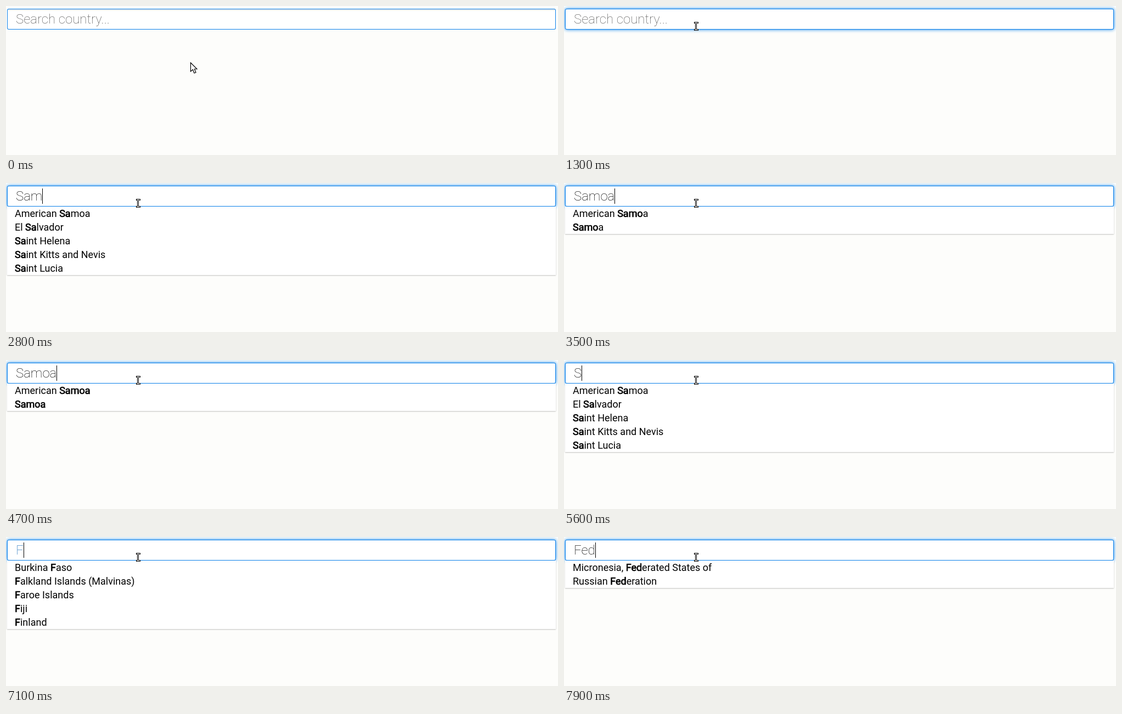
An HTML page with a canvas that plays this animation: 1006x272 px, repeating every 8000 ms.

```html
<!DOCTYPE html>
<html lang="en">
<head>
<meta charset="utf-8">
<title>Country search</title>
<style>
  html, body { margin: 0; width: 100%; height: 100%; overflow: hidden; background: #fdfdfb; }
  canvas { display: block; }
</style>
</head>
<body>
<canvas id="stage" width="1006" height="272"></canvas>
<script>
const ctx = document.getElementById('stage').getContext('2d', { alpha: false });
const LOOP = 8000;
const BLUE = '#0a80ea';
const INPUT_FONT = '100 24px Roboto, sans-serif';
const LIST_FONT = '400 18px Roboto, sans-serif';

const countries = [
  'American Samoa', 'Burkina Faso', 'El Salvador', 'Falkland Islands (Malvinas)',
  'Faroe Islands', 'Fiji', 'Finland', 'French Southern Territories',
  'Holy See (Vatican City State)', "Korea, Democratic People'S Republic of",
  'Micronesia, Federated States of', 'Russian Federation', 'Saint Helena',
  'Saint Kitts and Nevis', 'Saint Lucia', 'Samoa'
];

// [time, value]; each value holds until the next entry
const typed = [
  [0, ''], [1700, 'S'], [2300, 'Sa'], [2800, 'Sam'], [3100, 'Samo'], [3500, 'Samoa'],
  [4900, 'Samo'], [5100, 'Sam'], [5300, 'Sa'], [5600, 'S'], [5900, ''],
  [6900, 'F'], [7200, 'Fe'], [7800, 'Fed']
];
const queries = [
  [0, ''], [1800, 'S'], [2500, 'Sa'], [2900, 'Sam'], [3300, 'Samo'], [3700, 'Samoa'],
  [5100, 'Samo'], [5300, 'Sam'], [5500, 'Sa'], [5800, 'S'], [5900, ''],
  [7100, 'F'], [7400, 'Fe'], [7900, 'Fed']
];
const glow = [[0, 0], [800, 0.5], [900, 1]];
const pointer = [
  [0, [336, 103, 'arrow']], [100, [308, 86, 'arrow']], [300, [292, 74, 'arrow']],
  [400, [264, 55, 'arrow']], [500, [244, 40, 'beam']], [600, [240, 37, 'beam']]
];

const entryAt = (track, t) => track.findLast(([time]) => time <= t);
const valueAt = (track, t) => entryAt(track, t)[1];

function boxPath(x, y, w, h, r) {
  ctx.beginPath();
  ctx.roundRect(x, y, w, h, r);
}

function drawInput(focus) {
  ctx.save();
  ctx.fillStyle = BLUE;
  if (focus) {
    ctx.shadowColor = `rgba(10,128,234,${focus})`;
    ctx.shadowBlur = 6;
  }
  boxPath(2, 5, 1000, 38, 3);
  ctx.fill();
  ctx.restore();

  ctx.fillStyle = '#fff';
  boxPath(3, 6, 998, 36, 2);
  ctx.fill();

  // Soft inner edge, replaced by the glow on focus
  for (let i = 0; i < 3; i++) {
    ctx.fillStyle = `rgba(0,0,0,${(0.1 - i * 0.035) * (1 - focus)})`;
    ctx.fillRect(4, 6 + i, 996, 1);
  }
}

function drawText(t, focus) {
  const [keyTime, text] = entryAt(typed, t);
  ctx.font = INPUT_FONT;
  ctx.fillStyle = !text ? '#555' : text === 'F' ? '#2474bd' : '#000';
  ctx.fillText(text || 'Search country...', 18, 32);

  const start = keyTime || 700;
  if (focus && Math.floor((t - start) / 600) % 2 === 0) {
    ctx.fillStyle = '#000';
    ctx.fillRect(18 + Math.round(ctx.measureText(text).width), 10, 1, 28);
  }
}

function drawRow(name, query, y) {
  const at = name.search(new RegExp('\\b' + query));
  const end = at + query.length;
  let x = 16;
  [name.slice(0, at), name.slice(at, end), name.slice(end)].forEach((part, i) => {
    ctx.fillText(part, x, y);
    if (i === 1) ctx.strokeText(part, x, y);
    x += ctx.measureText(part).width;
  });
}

function drawList(query) {
  if (!query) return;
  const word = new RegExp('\\b' + query);
  const rows = countries.filter(name => word.test(name)).slice(0, 5);

  ctx.save();
  ctx.beginPath();
  ctx.rect(0, 43, 1006, 229);
  ctx.clip();
  ctx.shadowColor = 'rgba(0,0,0,0.25)';
  ctx.shadowBlur = 2;
  ctx.shadowOffsetY = 1;
  ctx.fillStyle = '#fff';
  ctx.fillRect(2, 43, 1000, rows.length * 25);
  ctx.restore();

  ctx.font = LIST_FONT;
  ctx.fillStyle = ctx.strokeStyle = '#000';
  ctx.lineWidth = 0.7;
  ctx.lineJoin = 'round';
  rows.forEach((name, i) => drawRow(name, query, 62 + i * 25));
}

function drawArrow() {
  const points = [[0, 0], [0, 16], [4, 12.5], [6.5, 19], [9.5, 18], [7, 11.5], [11.5, 11.5]];
  ctx.beginPath();
  points.forEach(([x, y]) => ctx.lineTo(x + 0.5, y + 0.5));
  ctx.closePath();
  ctx.fillStyle = '#fff';
  ctx.fill();
  ctx.strokeStyle = '#000';
  ctx.lineWidth = 1.2;
  ctx.lineJoin = 'miter';
  ctx.stroke();
}

function drawBeam() {
  const layer = (color, grow) => {
    ctx.fillStyle = color;
    for (const [x, y, w, h] of [[-2, -7, 6, 1], [0, -7, 1, 14], [-2, 6, 6, 1]]) {
      ctx.fillRect(x - grow, y - grow, w + 2 * grow, h + 2 * grow);
    }
  };
  layer('#000', 1);
  layer('#fff', 0);
}

function drawPointer([x, y, shape]) {
  ctx.save();
  ctx.translate(x, y);
  if (shape === 'arrow') drawArrow();
  else drawBeam();
  ctx.restore();
}

function draw(t) {
  const focus = valueAt(glow, t);
  ctx.fillStyle = '#fdfdfb';
  ctx.fillRect(0, 0, 1006, 272);
  drawInput(focus);
  drawText(t, focus);
  drawList(valueAt(queries, t));
  drawPointer(valueAt(pointer, t));
}

const began = performance.now();
function tick() {
  draw((performance.now() - began) % LOOP);
  requestAnimationFrame(tick);
}
tick();
</script>
</body>
</html>
```
